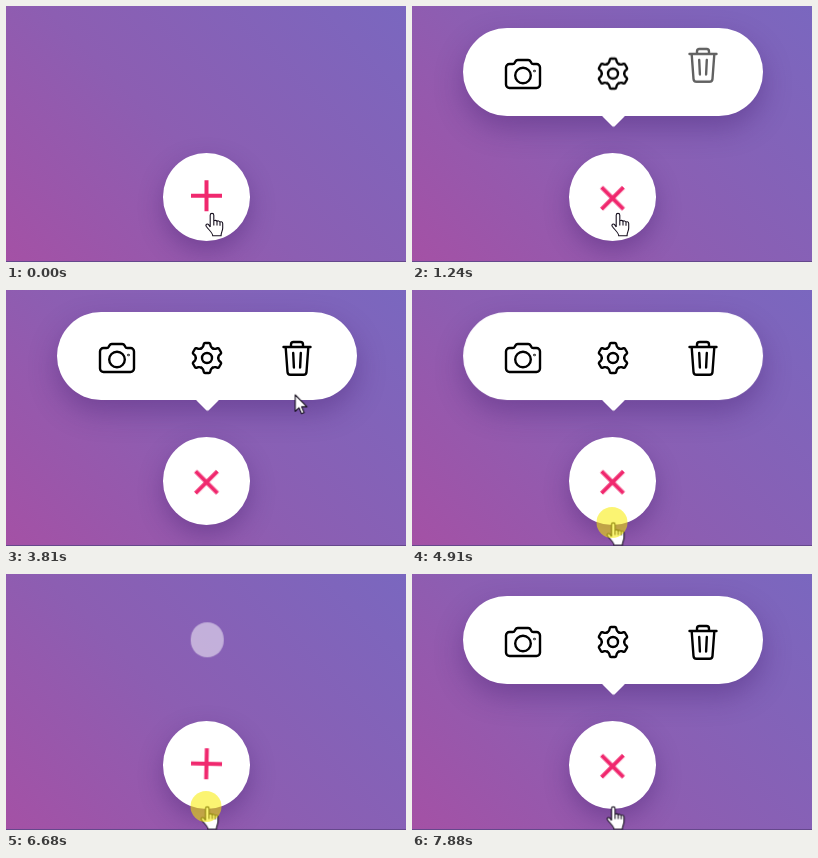
Recreate the animation shown at these times as an HTML page without scripts. Size 400 by 256 pixels, loop 8040 ms.

```html
<!DOCTYPE html>
<html lang="en">
<head>
<meta charset="utf-8">
<title>Floating menu button</title>
<style>
  :root { --pink: #f0286e; --gray: #58585a; --glide: cubic-bezier(.645, .045, .355, 1); }
  html, body { margin: 0; width: 100%; height: 100%; overflow: hidden; }
  body {
    position: relative;
    background: linear-gradient(45deg, #a451a5 0%, #8c5eb2 45%, #7a67bf 100%);
  }
  body::after {
    content: ""; position: absolute; left: 0; top: 255px; width: 100%; height: 1px;
    background: #65488c;
  }
  .pill, .button, .tip { position: absolute; background: #fff; }
  svg { position: absolute; left: 0; top: 0; z-index: 1; }

  /* every part shares one 8040 ms clock */
  .pill, .tip, .crumb, .plus, .icons, .icon, .icon > g, .cursor, .hand, .arrow, .click {
    animation: 8040ms linear infinite both;
  }

  .pill {
    left: 201px; top: 66px; border-radius: 44px;
    transform: translate(-50%, -50%);
    animation-name: pill; animation-timing-function: var(--glide);
  }
  @keyframes pill {
    0%, 1.24%, 73.51%, 82.21% { width: 30px; height: 35px; box-shadow: 0 12px 28px rgba(60, 25, 105, 0); }
    13.68%, 61.07%, 94.65%, 100% { width: 300px; height: 88px; box-shadow: 0 12px 28px rgba(60, 25, 105, .36); }
    0%, 1.24%, 73.51%, 82.21% { opacity: 0; }
    3%, 71.5%, 84% { opacity: 1; }
    13.68%, 61.07%, 94.65%, 100% { opacity: 1; }
  }

  .tip {
    left: 192.5px; top: 101px; width: 17px; height: 17px; border-radius: 2px;
    animation-name: tip;
  }
  @keyframes tip {
    0%, 7.45%, 67.3%, 88.42% { opacity: 0; transform: translateY(-30px) rotate(45deg); }
    7.46%, 67.29%, 88.43% { opacity: 1; transform: translateY(-30px) rotate(45deg); }
    10.7%, 64.05%, 91.67%, 100% { opacity: 1; transform: rotate(45deg); }
  }

  .crumb { animation-name: crumb; animation-timing-function: step-end; }
  @keyframes crumb {
    0%, 72.8%, 100% { opacity: 0; }
    66.5% { opacity: 1; }
  }

  .button {
    left: 156.5px; top: 147px; width: 87.5px; height: 88px; border-radius: 50%;
    box-shadow: 0 10px 24px rgba(60, 25, 105, .36);
  }
  .plus {
    transform-origin: 200px 191px;
    animation-name: spin; animation-timing-function: var(--glide);
  }
  @keyframes spin {
    0%, 1.24%, 73.51%, 82.21% { transform: rotate(0deg); }
    13.68%, 61.07%, 94.65%, 100% { transform: rotate(135deg); }
  }

  .icons { animation-name: icons; }
  @keyframes icons {
    0%, 7%, 64.5%, 88% { opacity: 0; }
    7.01%, 61.07%, 88.01%, 100% { opacity: 1; }
  }
  .icon { animation-name: drop; animation-timing-function: ease-in-out; }
  .icon:nth-child(2) { animation-delay: 100ms; }
  .icon:nth-child(3) { animation-delay: 200ms; }
  @keyframes drop {
    0%, 10.82%, 75%, 91.79% { opacity: 0; transform: translateY(-24px); }
    14.55%, 74.9%, 95.52%, 100% { opacity: 1; transform: none; }
  }
  .icon > g { fill: none; stroke: currentColor; stroke-width: 2.4; stroke-linecap: round; stroke-linejoin: round; }
  .camera { animation-name: camera; }
  .gear { animation-name: gear; }
  .trash { animation-name: trash; }
  @keyframes camera {
    0%, 24%, 32%, 100% { color: var(--gray); }
    25.2%, 30.7% { color: var(--pink); }
  }
  @keyframes gear {
    0%, 31.5%, 38.2%, 100% { color: var(--gray); }
    32.7%, 36.9% { color: var(--pink); }
  }
  @keyframes trash {
    0%, 37.4%, 47.3%, 100% { color: var(--gray); }
    38.3%, 45.8% { color: var(--pink); }
  }

  .cursor { animation-name: travel; animation-timing-function: ease-in-out; }
  @keyframes travel {
    0%, 18.4% { transform: translate(206px, 207px); }
    21.4% { transform: translate(150px, 197px); animation-timing-function: ease-out; }
    24.6%, 30.35% { transform: translate(112px, 77px); }
    32.2%, 36.82% { transform: translate(198px, 77px); }
    38.31%, 45.27% { transform: translate(308px, 77px); }
    52.61%, 54.72% { transform: translate(201px, 236px); }
    54.73%, 100% { transform: translate(201.3px, 232.5px); }
  }
  .hand, .arrow { stroke: #17101f; stroke-width: 1.1; stroke-linejoin: round; fill: #fff; animation-timing-function: step-end; }
  .hand { animation-name: hand; }
  .arrow { animation-name: arrow; }
  @keyframes hand {
    0%, 24%, 31.7%, 37.7%, 54.73%, 100% { opacity: 1; }
    20.4%, 30.9%, 37.2%, 46.2% { opacity: 0; }
  }
  @keyframes arrow {
    0%, 24%, 31.7%, 37.7%, 54.73%, 100% { opacity: 0; }
    20.4%, 30.9%, 37.2%, 46.2% { opacity: 1; }
  }

  .click { fill: #f8ec00; animation-name: click; animation-timing-function: step-end; }
  @keyframes click {
    0%, 3.11%, 62.94%, 84.08%, 100% { opacity: 0; transform: none; }
    1.24% { opacity: .55; transform: translate(5px, -25px); }
    61.06%, 82.2% { opacity: .55; transform: none; }
  }
</style>
</head>
<body>
<div class="pill"></div>
<div class="tip"></div>
<div class="button"></div>
<svg width="400" height="256" viewBox="0 0 400 256">
  <path class="crumb" d="M193 110.5l8 7 8-7M197 110.5l4 3.5 4-3.5" fill="none" stroke="#85808a" stroke-width="2"/>

  <path class="plus" d="M185 189.8h31M200.5 174.3v31" stroke="#f0286e" stroke-width="4"/>

  <g class="icons">
    <g class="icon"><g class="camera">
      <path d="M97.5 58h3.2c1.2 0 1.7-.5 2.2-1.6l.6-1c.5-1 1.2-1.4 2.3-1.4h10.4c1.1 0 1.8.4 2.3 1.4l.6 1c.5 1.1 1 1.6 2.2 1.6h3.2a3.5 3.5 0 0 1 3.5 3.5v17a3.5 3.5 0 0 1-3.5 3.5h-27a3.5 3.5 0 0 1-3.5-3.5v-17a3.5 3.5 0 0 1 3.5-3.5z"/>
      <circle cx="111" cy="69.5" r="7.8"/>
      <circle cx="122.5" cy="65" r=".4" stroke-width="1.8"/>
    </g></g>
    <g class="icon"><g class="gear">
      <g transform="translate(201 68)">
        <path id="tooth" d="M-5.6-9.7Q-4-10.8-3.7-12L-3.2-14Q-2.9-15-2-15H2Q2.9-15 3.2-14L3.7-12Q4-10.8 5.6-9.7"/>
        <use href="#tooth" transform="rotate(60)"/>
        <use href="#tooth" transform="rotate(120)"/>
        <use href="#tooth" transform="rotate(180)"/>
        <use href="#tooth" transform="rotate(240)"/>
        <use href="#tooth" transform="rotate(300)"/>
        <circle r="5"/>
      </g>
    </g></g>
    <g class="icon"><g class="trash">
      <path d="M277.5 57h27M285 56.5v-2a2.5 2.5 0 0 1 2.5-2.5h7a2.5 2.5 0 0 1 2.5 2.5v2"/>
      <path d="M279.7 57.5l1.8 24.5a3 3 0 0 0 3 2.8h13a3 3 0 0 0 3-2.8l1.8-24.5M287.2 63l.7 14.5M294.8 63l-.7 14.5"/>
    </g></g>
  </g>

  <g class="cursor">
    <g class="hand">
      <path transform="translate(-6.8 0)" d="M5 14V2.2a1.8 1.8 0 0 1 3.6 0V8.5c0-1.6 3.2-1.6 3.2.4 0-1.5 3-1.3 3 .7 0-1.3 2.7-1.2 2.7.8V15c0 3-1.6 4-1.6 7.8H7.5C7.5 19.5 3 16.5 1 13.2 0 11.3 2.3 10.3 3.4 11.6L5 14M8.6 8.5v4M11.8 9v3.5M14.8 9.7v3"/>
    </g>
    <path class="arrow" d="M0 0v16.5l3.8-3.6 2.5 5.9 2.6-1.1-2.5-5.8h5.3z"/>
  </g>
  <circle class="click" cx="200" cy="232.5" r="15.5"/>
</svg>
</body>
</html>
```
